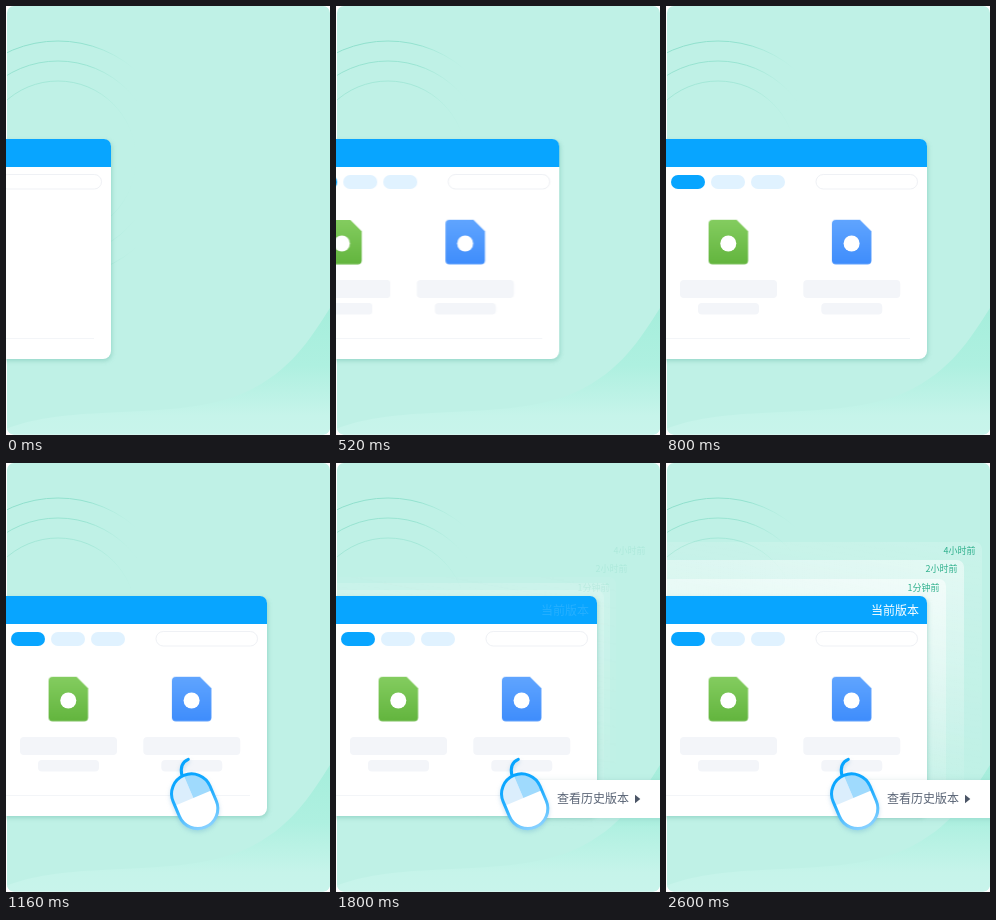
Write an HTML page that moves like this. It is 324 px wide and 429 px high and loops after 4 s.

```html
<!DOCTYPE html>
<html lang="zh-CN">
<head>
<meta charset="utf-8">
<title>版本历史</title>
<style>
html, body { margin: 0; width: 100%; height: 100%; overflow: hidden; background: #fff; }
svg { display: block; width: 324px; height: 429px; }
text { font-family: "Noto Sans CJK SC", "Noto Sans CJK JP", "Noto Sans CJK", sans-serif; }
.time { font-size: 9px; font-weight: 500; fill: #2fb08d; text-anchor: end; }
#win { filter: drop-shadow(1px 2px 2px rgba(50, 150, 130, .28)); }
#tip { filter: drop-shadow(0 1px 3px rgba(60, 130, 130, .2)); }
#mouse { filter: drop-shadow(0 2px 2px rgba(60, 140, 190, .25)); }
</style>
</head>
<body>
<svg viewBox="0 0 324 429">
  <defs>
    <linearGradient id="wave" x1="0" y1="302" x2="0" y2="429" gradientUnits="userSpaceOnUse">
      <stop offset="0" stop-color="#a6eedc"/><stop offset=".45" stop-color="#aef0e0"/>
      <stop offset=".85" stop-color="#c6f4ea"/><stop offset="1" stop-color="#c8f4eb"/>
    </linearGradient>
    <linearGradient id="arc" x1="0" y1="0" x2="136" y2="0" gradientUnits="userSpaceOnUse">
      <stop offset="0" stop-color="#8fdfcc"/><stop offset=".6" stop-color="#93e2cf"/>
      <stop offset="1" stop-color="#bff1e6" stop-opacity="0"/>
    </linearGradient>
    <linearGradient id="sheet" x1="1" y1="0" x2=".75" y2="1">
      <stop offset="0" stop-color="#fff"/><stop offset="1" stop-color="#fff" stop-opacity="0"/>
    </linearGradient>
    <linearGradient id="green" x2="0" y2="1">
      <stop offset="0" stop-color="#84cd60"/><stop offset="1" stop-color="#63b53e"/>
    </linearGradient>
    <linearGradient id="blue" x2="0" y2="1">
      <stop offset="0" stop-color="#60a5ff"/><stop offset="1" stop-color="#3f8dfc"/>
    </linearGradient>
    <linearGradient id="rim" x2="0" y2="1">
      <stop offset="0" stop-color="#08a5ff"/><stop offset=".45" stop-color="#22aeff"/>
      <stop offset="1" stop-color="#86d0ff"/>
    </linearGradient>
    <clipPath id="stage"><rect x="1" width="323" height="428.5" rx="7"/></clipPath>
    <clipPath id="shell"><rect x="-20" y="-28" width="40" height="56" rx="20"/></clipPath>
    <path id="page" d="M4 0H28L39.5 11.5V40.500a4 4 0 0 1-4 4H4a4 4 0 0 1-4-4V4a4 4 0 0 1 4-4z"/>
  </defs>

  <g clip-path="url(#stage)">
    <rect width="324" height="429" fill="#bff1e6"/>
    <path d="M324 302C304 333 285 365 240 386C200 404 150 404 95 407C55 409 25 413 0 423V429H324Z" fill="url(#wave)"/>
    <g id="arcs" fill="none" stroke="url(#arc)"/>
    <g id="sheets"/>
  </g>
  <g id="times"></g>

  <g id="win">
    <rect x="-300" y="133" width="561" height="220" rx="8" fill="#fff"/>
    <path d="M-300 133H254a7 7 0 0 1 7 7V161H-300Z" fill="#08a5ff"/>
    <rect x="5" y="169" width="34" height="14" rx="7" fill="#08a5ff"/>
    <rect x="45" y="169" width="34" height="14" rx="7" fill="#e0f2ff"/>
    <rect x="85" y="169" width="34" height="14" rx="7" fill="#e0f2ff"/>
    <rect x="150" y="168.500" width="101.500" height="14.500" rx="7.250" fill="#fff" stroke="#eff1f5"/>
    <path d="M-300 332.500H244" stroke="#f3f5f8"/>
    <text id="current" x="253" y="152.300" font-size="12" font-weight="500" fill="#fff" text-anchor="end">当前版本</text>
    <g id="files"></g>
  </g>

  <g id="tip">
    <rect x="190" y="317" width="180" height="38" rx="4" fill="#fff"/>
    <text x="221" y="340.300" font-size="12" fill="#5a6475">查看历史版本</text>
    <path d="M299 331.800L304.300 336L299 340.200Z" fill="#4b5566"/>
  </g>

  <g id="mouse">
    <path d="M176 313C174 305 176 299 182.300 296.300" fill="none" stroke="#08a5ff" stroke-width="3" stroke-linecap="round"/>
    <g transform="translate(188.700 338.200) rotate(-23)">
      <rect x="-20" y="-28" width="40" height="56" rx="20" fill="#fff"/>
      <g clip-path="url(#shell)">
        <rect x="-20" y="-28" width="20" height="24.500" fill="#dbeefc"/>
        <rect y="-28" width="20" height="24.500" fill="#9fdafd"/>
      </g>
      <rect x="-20" y="-28" width="40" height="56" rx="20" fill="none" stroke="url(#rim)" stroke-width="3"/>
    </g>
  </g>
</svg>
<script>
const LOOP = 4000;
const GLIDE = 'cubic-bezier(.59, 0, .22, 1)';
const $ = id => document.getElementById(id);

function add(parent, tag, attrs, text) {
  const el = document.createElementNS('http://www.w3.org/2000/svg', tag);
  for (const key in attrs) el.setAttribute(key, attrs[key]);
  if (text) el.textContent = text;
  return $(parent).appendChild(el);
}

// Holds `from`, moves between the two times, then holds `to` until the loop cuts back.
function move(el, from, to, start, end, easing = 'linear') {
  el.animate([
    { ...from, offset: 0 },
    { ...from, offset: start / LOOP, easing },
    { ...to, offset: end / LOOP },
    { ...to, offset: 1 }
  ], { duration: LOOP, iterations: Infinity });
}
const shift = (x, y = 0) => ({ transform: `translate(${x}px, ${y}px)` });
const fade = (el, start, end) => move(el, { opacity: 0 }, { opacity: 1 }, start, end);

[[118, 1], [98, .85], [78, .6]].forEach(([r, opacity]) =>
  add('arcs', 'circle', { cx: 52, cy: 153, r, opacity }));

['green', 'blue'].forEach((color, i) => {
  const x = 14 + i * 123.3;
  add('files', 'use', { href: '#page', x: x + 28.6, y: 213.8, fill: `url(#${color})` });
  add('files', 'circle', { cx: x + 48.3, cy: 237.5, r: 8, fill: '#fff' });
  add('files', 'rect', { x, y: 274, width: 97, height: 18, rx: 4, fill: '#f3f5f9' });
  add('files', 'rect', { x: x + 18, y: 297, width: 61, height: 11.5, rx: 4, fill: '#f3f5f9' });
});

// Back to front
[[316, 79, .17, '4小时前'], [298, 97, .5, '2小时前'], [280, 116, .55, '1分钟前']].forEach(([right, top, alpha, label]) => {
  const sheet = add('sheets', 'rect', {
    x: right - 320, y: top, width: 320, height: 240, rx: 7, fill: 'url(#sheet)', 'fill-opacity': alpha
  });
  move(sheet, { ...shift(261 - right, 133 - top), opacity: 0 }, { ...shift(0), opacity: 1 }, 1580, 2160, GLIDE);
  const time = add('times', 'text', { class: 'time', x: right - 6.5, y: top + 11.8 }, label);
  fade(time, 1760, 2100);
});

move($('win'), shift(-156), shift(0), 200, 800, GLIDE);
move($('files'), shift(-77), shift(0), 200, 800, GLIDE);
document.querySelectorAll('#files > *').forEach(el => fade(el, 200, 500));
fade($('current'), 1760, 2100);
fade($('mouse'), 1000, 1160);
move($('tip'), { ...shift(-20), opacity: 0 }, { ...shift(0), opacity: 1 }, 1180, 1580, GLIDE);
</script>
</body>
</html>
```
